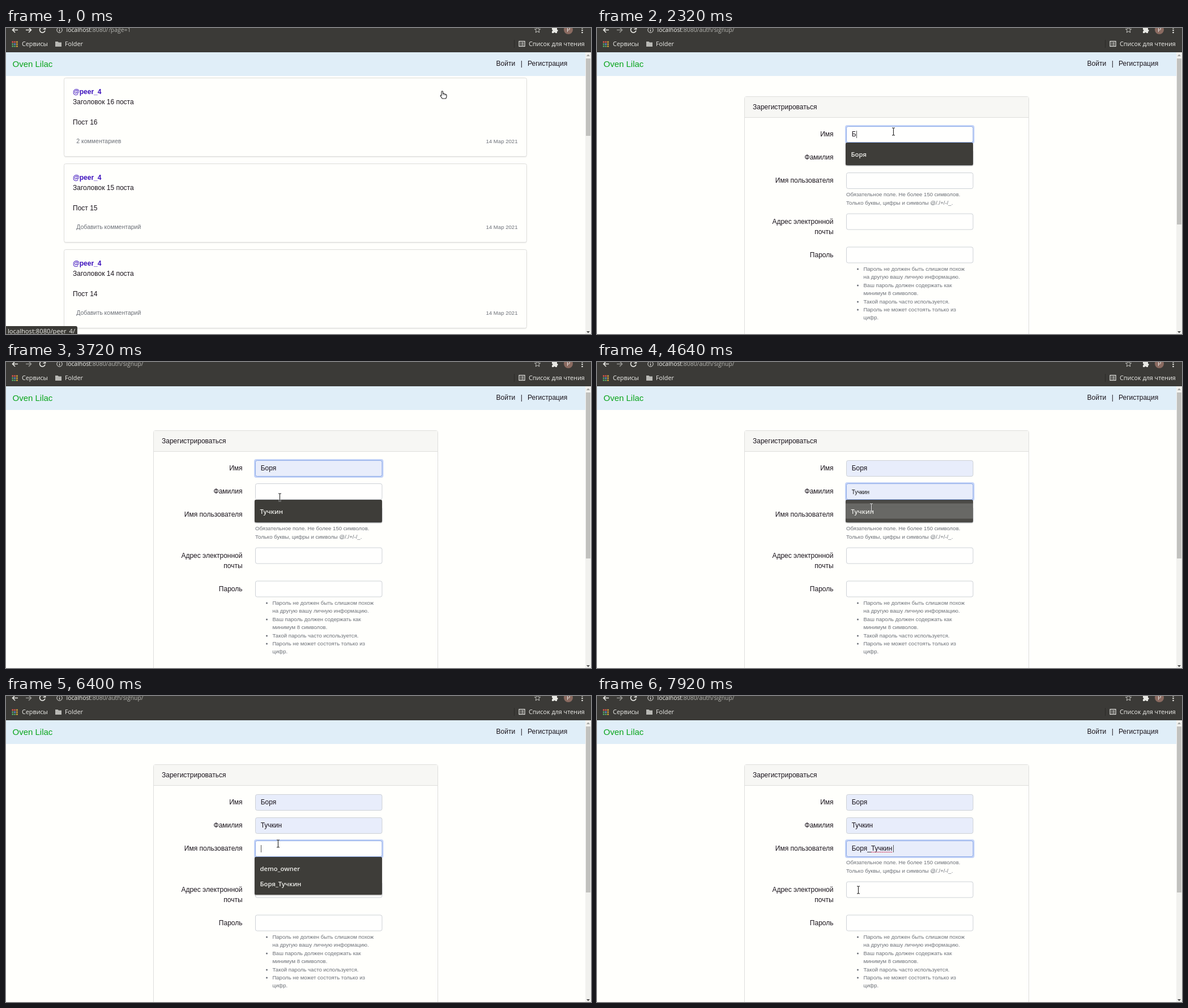
Recreate the animation shown at these times as an HTML page. Size 1033 by 542 pixels, loop 8000 ms.

```html
<!DOCTYPE html>
<html lang="ru">
<head>
<meta charset="utf-8">
<title>Регистрация</title>
<style>
html, body { margin: 0; width: 100%; height: 100%; overflow: hidden; background: #fffffc; }
svg { display: block; }
text { font: 12px "Liberation Sans", Arial, sans-serif; fill: #1a141c; white-space: pre; }
.ui { font: 10.8px "Open Sans", "Noto Sans", sans-serif; fill: #eeeeea; }
.url { font-size: 10.4px; }
.status { font-size: 11.2px; }
.pop { font-size: 11.3px; font-weight: 600; }
.brand { font-size: 15px; fill: #0aa51c; }
.user { font-weight: bold; fill: #3c10bd; }
.btn { font-size: 10.5px; fill: #6c7078; }
.small { font-size: 9.6px; fill: #6c7078; }
.preview { font-size: 10px; fill: #111; }
.end { text-anchor: end; }
</style>
</head>
<body>
<svg id="stage" width="1033" height="542" viewBox="0 0 1033 542">
  <g id="page"></g><g id="chrome"></g><g id="top"></g>
</svg>
<script>
const LOOP = 8000, TICK = 40;
const NAME = 'Боря', SURNAME = 'Тучкин', LOGIN = NAME + '_' + SURNAME;
const SIGNUP_AT = 1120;
const BAR = 43;

const text = (x, y, s, cls = '') => `<text x="${x}" y="${y}" class="${cls}">${s}</text>`;
const rect = (x, y, w, h, fill, more = '') =>
  `<rect x="${x}" y="${y}" width="${w}" height="${h}" fill="${fill}" ${more}/>`;
const path = (d, stroke, width = 1, fill = 'none', more = '') =>
  `<path d="${d}" stroke="${stroke}" stroke-width="${width}" fill="${fill}" ${more}/>`;
const circle = (x, y, r, fill, more = '') => `<circle cx="${x}" cy="${y}" r="${r}" fill="${fill}" ${more}/>`;
const within = (t, a, b) => t >= a && t < b;

// Top edges of the five form inputs
const fieldY = [174.5, 215.5, 256.5, 329, 388];

const popups = [
  { field: 0, items: [NAME], open: 2320, hover: [2800], accept: 3040 },
  { field: 1, items: [SURNAME], open: 3680, hover: [4280], accept: 4640 },
  { field: 2, items: ['demo_owner', LOGIN], open: 6360, hover: [6640, 6840], accept: 7640 },
];

// on, off, x, field
const carets = [
  [SIGNUP_AT, 1760, 450, 0], [2080, 2320, 450, 0], [2320, 2800, 458, 0],
  [3080, 3560, 478, 0], [3800, 4280, 450, 1], [4720, 5240, 488, 1],
  [5800, 6240, 488, 1], [6240, 6640, 450, 2], [7680, LOOP, 523, 2],
];

// time, x, y
const track = [
  [40, 772, 118], [600, 954, 70], [1320, 954, 70], [1640, 608, 153], [2080, 523, 183],
  [2560, 523, 183], [2840, 492, 224], [3080, 490, 226], [3280, 483, 250], [3400, 483, 250],
  [3560, 483, 239], [4120, 483, 239], [4400, 484, 257], [4640, 484, 257], [4880, 481, 278],
  [5040, 480, 277], [5760, 480, 277], [5840, 480, 268], [6000, 480, 261], [6600, 480, 261],
  [6640, 478, 309], [6760, 478, 309], [7040, 472, 332], [7200, 472, 332], [7400, 466, 336],
  [7520, 466, 336], [7800, 461, 343],
];

function pointer(t) {
  const i = track.findIndex(k => k[0] > t);
  if (i === 0) return track[0].slice(1);
  if (i < 0) return track[track.length - 1].slice(1);
  const [t0, x0, y0] = track[i - 1], [t1, x1, y1] = track[i];
  const p = (t - t0) / (t1 - t0);
  return [Math.round(x0 + (x1 - x0) * p), Math.round(y0 + (y1 - y0) * p)];
}

function feed() {
  return [16, 15, 14].map((n, i) => {
    const y = i * 152;
    return rect(102.5, 89.5 + y, 817, 140, '#f1f1ef', 'rx="3"') +
      rect(102.5, 88.5 + y, 817, 139, '#fffffc', 'rx="3" stroke="#dcdcda"') +
      text(118, 117 + y, '@peer_4', 'user') +
      text(118, 135 + y, `Заголовок ${n} поста`) +
      text(118, 171 + y, `Пост ${n}`) +
      text(124.3, 204 + y, i ? 'Добавить комментарий' : '2 комментариев', 'btn') +
      text(903.5, 204 + y, '14 Мар 2021', 'small end');
  }).join('');
}

function fieldState(t, i) {
  const p = popups[i];
  if (!p) return {};
  if (t > p.accept) return { value: p.items[p.items.length - 1], filled: true };
  const hovered = p.hover.filter(h => t >= h).length - 1;
  if (hovered >= 0) return { value: p.items[hovered], filled: true, preview: true };
  return { value: i === 0 && t >= p.open ? NAME[0] : '' };
}

function form(t) {
  const focus = t < 3760 ? 0 : t < 6240 ? 1 : 2;
  let s = rect(260.5, 121.5, 502, 440, '#fffffc', 'rx="3" stroke="#dededc"') +
    rect(261, 122, 501, 36, '#f7f7f4') + path('M261 158.5H762', '#dededc') +
    text(275, 144, 'Зарегистрироваться');
  [[192, 'Имя'], [233, 'Фамилия'], [274, 'Имя пользователя'], [347, 'Адрес электронной'],
   [365, 'почты'], [406, 'Пароль']].forEach(([y, label]) => s += text(417.5, y, label, 'end'));

  fieldY.forEach((y, i) => {
    const f = fieldState(t, i), on = i === focus;
    if (on) s += rect(438, y - 2.5, 228.5, 33, '#c3d3f8', 'rx="4"');
    s += rect(440.5, y, 223.5, 28, f.filled ? '#e8edfb' : '#fffffe',
      `rx="3" stroke="${on ? '#8ba9e6' : '#cdd1d6'}"`);
    if (f.value) s += text(449.7, y + 17.5 + (i === 1 && f.preview ? .5 : 0), f.value, f.preview ? 'preview' : '');
  });
  if (t > 7680) s += path('M484 276.5H522', '#d03050', 1.2, 'none', 'stroke-dasharray="2 .7"');

  ['Обязательное поле. Не более 150 символов.', 'Только буквы, цифры и символы @/./+/-/_.']
    .forEach((line, i) => s += text(440, 298 + i * 15, line, 'small'));
  ['•Пароль не должен быть слишком похож', 'на другую вашу личную информацию.',
   '•Ваш пароль должен содержать как', 'минимум 8 символов.',
   '•Такой пароль часто используется.', '•Пароль не может состоять только из', 'цифр.']
    .forEach((line, i) => {
      const y = Math.round(430 + 14.4 * i);
      if (line[0] === '•') s += circle(460.5, y - 3, 1.5, '#6c7078');
      s += text(470.4, y, line.replace('•', ''), 'small');
    });
  carets.filter(c => within(t, c[0], c[1]))
    .forEach(c => s += rect(c[2], fieldY[c[3]] + 7.5, 1, 13, '#555'));
  return s;
}

function popup(t, p) {
  const fade = Math.min(1, 1 - (t - p.accept + 15) / 215);
  if (t < p.open || fade <= 0) return '';
  const y = fieldY[p.field] + 28.5, h = 13 + 27 * p.items.length;
  const hovered = p.hover.filter(v => t >= v).length - 1;
  let s = rect(438.5, y + 1, 226, h + .8, '#0003', 'rx="3"') + rect(439, y, 225, h, '#3e3d39', 'rx="2"');
  p.items.forEach((item, i) => {
    if (i === hovered) s += rect(439, y + 6.5 + 27 * i, 225, 27, '#5d5d5a');
    s += text(448.5, y + 24.5 + 27 * i, item, 'ui pop');
  });
  return `<g opacity="${fade}">${s}</g>`;
}

function cursor(t) {
  const [x, y] = pointer(t);
  const overLink = x > 915 && y < 85;
  let s;
  if (t < 600 || overLink) {
    s = path('M-3.5 1V-5.2Q-3.5-6.8-2.2-6.8T-.9-5.2V-2Q.4-2.8 1.3-1.6 2.6-2.2 3.4-.9 5.5-1 5.5 1V3.2L4.2 6.5H-2.2L-5.3 1.9Q-5.4 0-3.5 1Z',
      '#222', 1.1, '#fff', 'stroke-linejoin="round"') + path('M-.8-1.5V1M1.4-1V1.2M3.4-.4V1.4', '#555', .6);
  } else if (x > 438 && x < 666 && y >= 170) {
    const dark = popups.some(p => within(t, p.open, p.accept + 120) && y > fieldY[p.field] + 30);
    const beam = 'M-2.5-6.5H-.8L0-5.7.8-6.5H2.5M0-5.7V5.7M-2.5 6.5H-.8L0 5.7.8 6.5H2.5';
    s = path(beam, dark ? '#3339' : '#fff9', 2.4) + path(beam, dark ? '#eee' : '#222', 1.1);
  } else {
    s = path('M-4-7V6L-1 3.3 1 8 3 7.1 1 2.6H5Z', '#222', 1, '#fff');
  }
  return `<g transform="translate(${x + .5} ${y + .5})">${s}</g>`;
}

function bubble(t) {
  if (t >= 1480) return '';
  const [w, s] = t < 520 ? [126, 'localhost:8080/peer_4/']
    : t < 880 ? [155, 'localhost:8080/auth/signup/'] : [342, 'Ожидание localhost…'];
  return path(`M0 542V528H${w - 3}Q${w} 528 ${w} 531V542Z`, 'none', 0, '#3b3a36') + text(3, 541, s, 'ui status');
}

function toolbar(signup) {
  const fg = '#e8e8e4', dim = '#92928e';
  let s = rect(0, 0, 1033, BAR, '#3b3a37') +
    path('M21 3.5H11.5M16 -1L11.5 3.5 16 8', fg, 1.6) +
    path('M35 3.5H44.5M40 -1L44.5 3.5 40 8', signup ? dim : fg, 1.6) +
    path('M68.3 0.5A4.8 4.8 0 1 0 69 4.5M69.5-2V2H65.5', fg, 1.6) +
    circle(94.5, 3.5, 4.7, 'none', `stroke="${fg}"`) + path('M94.5 3V6.3M94.5 .8V2', fg, 1.2) +
    `<text x="106.5" y="7" class="ui url">localhost<tspan fill="#b5b5b1">:8080/${signup ? 'auth/signup/' : '?page=1'}</tspan></text>` +
    path('M938.5-2L940 1.7 943.5 2 940.8 4.4 941.8 8 938.5 6 935.2 8 936.2 4.4 933.5 2 937 1.7Z', '#c9c9c5') +
    path('M964 0H967Q967-3 969-2T970 0H973V3Q975 3 974.5 5T973 6V9H970Q969 6 967 9H964V6Q967 4 964 3Z', 'none', 0, fg) +
    circle(993, 3, 8, '#8a6a60') + text(990, 6.5, 'P', 'ui url') +
    [0, 4, 8].map(y => circle(1017.5, y, 1.3, fg)).join('');
  const dots = ['#e0574b', '#e0574b', '#d8a83c', '#57a966', '#5b8fe0', '#d8a83c', '#57a966', '#57a966', '#d8a83c'];
  dots.forEach((c, i) => s += rect(10.5 + i % 3 * 3.8, 23.5 + Math.floor(i / 3) * 3.8, 2.6, 2.6, c));
  s += text(28, 32, 'Сервисы', 'ui') +
    path('M87 24H91.5L93 25.5H98V33H87Z', 'none', 0, '#b9b9b5') + text(104, 32, 'Folder', 'ui') +
    path('M897.5 21V35', '#2b2a27') + rect(906, 23.5, 10, 9, 'none', `stroke="${fg}" stroke-width="1.2"`) +
    path('M908 26H909.2M908 28H909.2M908 30.3H909.2M910.3 26H914M910.3 28H914M910.3 30.3H914', fg) +
    text(923, 32, 'Список для чтения', 'ui');
  return s;
}

function header(t) {
  const [x, y] = pointer(t), hot = x > 915 && y < 80;
  return rect(0, BAR, 1023, 42, '#e0eef8') + text(11.5, 69, 'Oven Lilac', 'brand') +
    text(865.5, 67, 'Войти') + text(908.8, 67, '|') + text(921, 67, 'Регистрация') +
    (hot ? path('M921 68.5H992', '#1a141c') : '');
}

function scrollbar(signup) {
  return rect(1023, BAR, 10, 542 - BAR, '#f1f1ee') + rect(1024, 54, 8, signup ? 294 : 137, '#c1c1be') +
    path('M1025 50L1028 46.5 1031 50Z', 'none', 0, '#a2a2a0') +
    path('M1025 537L1028 540.5 1031 537Z', 'none', 0, '#505050');
}

const layers = ['page', 'chrome', 'top'].map(id => document.getElementById(id));
const shown = [];
function put(i, markup) {
  if (shown[i] !== markup) layers[i].innerHTML = shown[i] = markup;
}

function render() {
  const t = Math.floor(performance.now() % LOOP / TICK) * TICK;
  const signup = t >= SIGNUP_AT;
  put(0, signup ? form(t) : feed());
  put(1, toolbar(signup) + header(t) + scrollbar(signup));
  put(2, popups.map(p => popup(t, p)).join('') + bubble(t) + cursor(t));
  requestAnimationFrame(render);
}
render();
</script>
</body>
</html>
```
